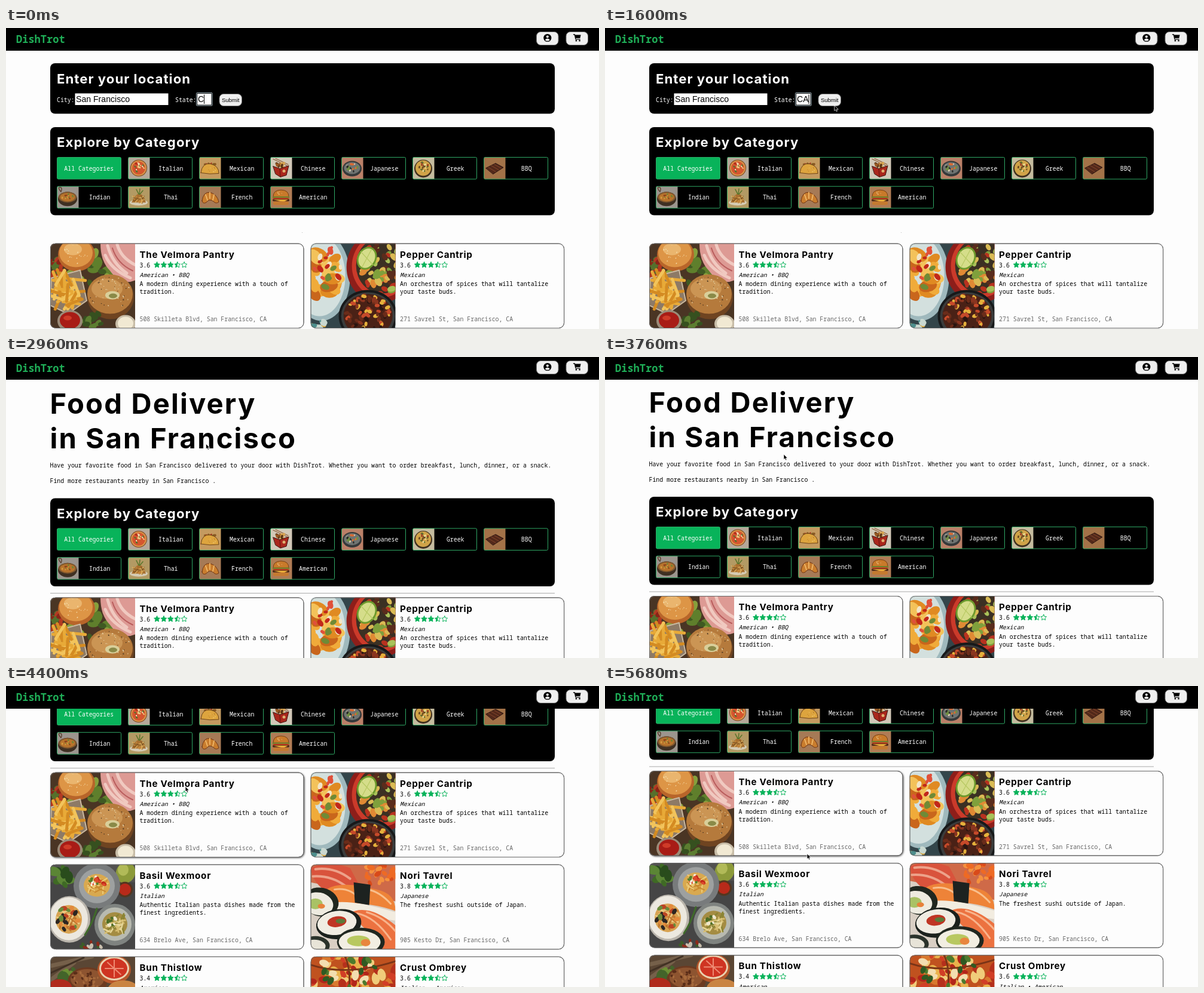
Recreate the animation shown at these times as an HTML page. Size 992 by 504 pixels, loop 5.76 s.

```html
<!DOCTYPE html>
<html lang="en">
<head>
<meta charset="utf-8">
<title>Food delivery</title>
<style>
  html, body { margin: 0; width: 100%; height: 100%; overflow: hidden; background: #fdfdfd; }
  svg { display: block; width: 992px; height: 504px; }
  text { font: 9.86px "Noto Sans Mono", "DejaVu Sans Mono", monospace; fill: #000; }
  .head { font-family: Inter, sans-serif; font-weight: 700; font-optical-sizing: none; letter-spacing: .046em; }
  .h1 { font-size: 47.2px; }
  .h2 { font-size: 22.2px; fill: #fff; }
  .h3 { font-size: 15.2px; }
  .brand { font-size: 17px; font-weight: 700; fill: #1fae57; }
  .light { fill: #fff; }
  .mid { text-anchor: middle; }
  .it { font-style: italic; }
  .addr { fill: #666; }
  .field { font: 14.1px "Liberation Sans", Arial, sans-serif; }
  .btn { font: 9.5px "Liberation Sans", Arial, sans-serif; text-anchor: middle; }
  .hover .base { filter: drop-shadow(1.5px 1.5px 1.5px rgba(0, 0, 0, .65)); }
</style>
</head>
<body>
<svg id="stage" viewBox="0 0 992 504"></svg>
<script>
let seed = 7;
const rnd = () => (seed = seed * 16807 % 2147483647) / 2147483647;

const oval = (x, y, rx, fill, ry = rx, rot = 0) =>
  `<ellipse cx="${x}" cy="${y}" rx="${rx}" ry="${ry}" fill="${fill}" transform="rotate(${rot} ${x} ${y})"/>`;
const path = (d, fill, stroke = 'none', w = 1) =>
  `<path d="${d}" fill="${fill}" stroke="${stroke}" stroke-width="${w}" stroke-linecap="round" stroke-linejoin="round"/>`;
const line = (d, stroke, w) => path(d, 'none', stroke, w);
const box = (x, y, w, h, fill, r = 0, stroke = 'none') =>
  `<rect x="${x}" y="${y}" width="${w}" height="${h}" rx="${r}" fill="${fill}" stroke="${stroke}"/>`;
const text = (x, y, str, cls = '') => `<text x="${x}" y="${y}" class="${cls}">${str}</text>`;
const group = (x, y, body, attr = '') => `<g transform="translate(${x} ${y})" ${attr}>${body}</g>`;

// Random blobs inside an oval
function bits(n, x, y, rx, ry, size, colors) {
  let out = '';
  for (let i = 0; i < n; i++) {
    const a = rnd() * 6.283, d = Math.sqrt(rnd());
    const s = size * (.6 + rnd() * .6);
    out += oval((x + Math.cos(a) * d * rx).toFixed(1), (y + Math.sin(a) * d * ry).toFixed(1),
      s.toFixed(1), colors[i % colors.length], (s * .65).toFixed(1), Math.round(rnd() * 180));
  }
  return out;
}
// Random short strokes: fries, noodles
function sticks(n, x, y, rx, ry, len, w, colors) {
  let out = '';
  for (let i = 0; i < n; i++) {
    const a = rnd() * 3.14, px = x + (rnd() * 2 - 1) * rx, py = y + (rnd() * 2 - 1) * ry;
    const dx = Math.cos(a) * len / 2, dy = Math.sin(a) * len / 2;
    out += line(`M${(px - dx).toFixed(1)} ${(py - dy).toFixed(1)}L${(px + dx).toFixed(1)} ${(py + dy).toFixed(1)}`,
      colors[i % colors.length], w);
  }
  return out;
}

const photos = {
  bagel: () => box(0, 0, 142, 142, '#4a3524')
    + bits(30, 76, 50, 42, 34, 10, ['#5f7f2c', '#86a03c', '#3f5a22'])
    + bits(16, 8, 40, 14, 18, 7, ['#b23a22', '#55702c', '#8a2418'])
    + path('M84 0H142V62Q118 72 100 46Q84 30 84 0Z', '#dd9a94')
    + line('M96 4Q104 34 128 50M112 2Q118 24 142 36M92 20Q102 44 134 58', '#f0c9c0', 5)
    + line('M104 8Q112 34 138 46', '#b95c5c', 2)
    + oval(44, 19, 31, '#b8652a', 28) + oval(43, 16, 28, '#dd9546', 24) + oval(38, 10, 15, '#eab56e', 10)
    + bits(20, 44, 16, 22, 18, 1, ['#f6dfae'])
    + path('M2 58L50 45L61 96L30 118L0 104Z', '#8d7a66', '#c9b8a0', 2)
    + sticks(38, 28, 79, 19, 22, 28, 5, ['#e8aa38', '#d48b22', '#f2c45c'])
    + oval(101, 90, 39, '#6f4421', 37) + oval(100, 85, 38, '#b57a3c', 33) + oval(95, 76, 26, '#cb9554', 17)
    + bits(60, 100, 84, 34, 29, 1.1, ['#f0dfb8', '#4a3520', '#d8b780'])
    + oval(104, 87, 12, '#d9cf9a', 7) + oval(105, 88, 7, '#8a8a48', 4)
    + bits(14, 72, 128, 18, 12, 7, ['#5c7d30', '#36501f'])
    + oval(33, 130, 21, '#9b8b78', 18) + oval(33, 129, 17, '#a81c16', 14) + oval(29, 125, 7, '#cf3b28', 4)
    + oval(126, 135, 17, '#c8bda8', 15) + oval(126, 134, 13, '#f1e9d3', 11),

  nachos: () => box(0, 0, 142, 142, '#33454a')
    + oval(18, 56, 48, '#9fb9bd', 74) + oval(15, 55, 43, '#d3e0de', 67)
    + bits(26, 20, 52, 26, 46, 15, ['#e08a22', '#f0ab3a', '#c9661c', '#f3c25a'])
    + bits(18, 28, 40, 22, 34, 6, ['#c2281a', '#e0503a', '#6f8a36', '#f2e6c8'])
    + oval(116, 40, 56, '#8d1e1a', 60) + oval(118, 38, 49, '#cb3a2a', 53) + oval(119, 37, 43, '#3b3023', 47)
    + bits(70, 120, 42, 36, 42, 7, ['#7fa03c', '#d9bb55', '#b8321f', '#5a2c1c', '#a9c25a', '#e08a34'])
    + oval(94, 25, 16, '#6d9a2c', 20, 28) + oval(94, 25, 13, '#d5dd8a', 17, 28)
    + line('M84 14L104 36M102 10L86 40', '#b7c862', 1.2)
    + oval(96, 122, 49, '#17191a', 44) + oval(96, 122, 45, '#3a3c3c', 40) + oval(96, 121, 41, '#4a2116', 36)
    + bits(80, 96, 118, 37, 31, 4.4, ['#6b2c1a', '#2a1510', '#e5b13c', '#8a3520', '#c64a2a'])
    + bits(12, 10, 137, 20, 9, 6, ['#d8a43c', '#4d8f8d', '#c9d8d0']),

  pasta: () => box(0, 0, 142, 142, '#454545') + box(0, 0, 142, 30, '#525150')
    + bits(12, 20, 20, 18, 17, 10, ['#3f6a25', '#5b8535', '#294c1c'])
    + oval(126, 14, 16, '#8c9a3a', 18, 25) + oval(122, 9, 9, '#b1ba58', 10)
    + oval(125, 42, 13, '#55361f') + oval(125, 42, 10, '#b82a1a')
    + oval(78, 36, 39, '#787b7c', 38) + oval(78, 36, 30, '#9da0a0', 29)
    + oval(78, 35, 22, '#d9a94f', 19) + sticks(26, 78, 34, 14, 11, 12, 2, ['#edcc7a', '#c9882f'])
    + bits(16, 78, 31, 14, 12, 4, ['#c2281a', '#dd4a2c', '#557f2c', '#f4eee0'])
    + oval(32, 92, 35, '#bab5ac', 39) + oval(31, 91, 32, '#ece8df', 36)
    + oval(31, 92, 22, '#d8a352', 24) + sticks(30, 31, 92, 15, 16, 13, 2.2, ['#eccb84', '#c0762e'])
    + bits(20, 30, 90, 18, 20, 5, ['#2c2622', '#bb4424', '#e38a3c', '#6a8a3a'])
    + line('M58 118Q70 100 78 74', '#3f6a2a', 3)
    + oval(108, 101, 34, '#7f8380', 35) + oval(108, 100, 28, '#b8bab0', 28)
    + oval(108, 100, 21, '#a48c42', 20) + sticks(34, 108, 100, 15, 13, 10, 2.6, ['#d7be72', '#8a8434', '#e5d596'])
    + bits(8, 108, 98, 12, 12, 4, ['#4d6d25', '#efe7cd'])
    + bits(10, 70, 136, 18, 6, 5, ['#8d2a1a', '#3d5d28', '#c9bfae']),

  sushi: () => box(0, 0, 142, 142, '#d9cfc4')
    + path('M0 0H142V62L70 44L0 30Z', '#cf6a48')
    + path('M0 6Q30 -8 66 6L84 40L22 42Q4 30 0 6Z', '#d9533c')
    + line('M8 8Q40 4 66 24M4 20Q34 18 58 36', '#eda28a', 4)
    + bits(22, 112, 16, 28, 18, 6, ['#ee6a24', '#f5913e', '#d94a1a'])
    + path('M26 42Q50 26 110 42Q142 48 142 78Q92 60 30 66Z', '#ee8338')
    + line('M40 42Q66 38 82 58M96 42Q116 46 134 66', '#f9bf8c', 3)
    + path('M72 30L100 34L98 68L74 64Z', '#1d2220')
    + path('M30 66Q60 56 142 80V94L60 84Z', '#f2ece0')
    + path('M64 82Q96 64 142 102V142H120Q92 106 64 82Z', '#ec7240')
    + line('M78 82Q108 88 134 126M94 80Q122 88 142 112', '#f8b48c', 3)
    + oval(17, 63, 30, '#20271f', 24, 12) + oval(13, 66, 25, '#eeebe0', 19, 12)
    + oval(8, 66, 12, '#a9c265', 9) + oval(18, 70, 6, '#e7813a', 4)
    + oval(47, 100, 38, '#1b211d', 25, -8) + oval(44, 98, 33, '#f0ece2', 20, -8)
    + oval(44, 96, 16, '#bf3524', 9, -8) + oval(50, 95, 8, '#5b7a3a', 4)
    + oval(84, 130, 40, '#202720', 24) + oval(82, 130, 35, '#f2eee2', 19)
    + oval(80, 128, 19, '#b8c860', 9) + oval(92, 131, 8, '#e8863e', 6)
    + oval(8, 136, 24, '#2a322a', 16) + oval(6, 137, 19, '#e8e4d8', 11),

  burger: () => box(0, 0, 142, 142, '#5a4634')
    + line('M0 16L70 0M0 40L40 10', '#75604a', 7) + line('M0 28L56 2', '#413124', 3)
    + bits(14, 32, 36, 26, 14, 8, ['#6d8f34', '#43642a'])
    + oval(62, 42, 33, '#6c3a20', 24) + oval(62, 38, 28, '#8d5430', 17)
    + bits(30, 62, 38, 26, 16, 3, ['#5a2d18', '#a66a3c'])
    + oval(107, 22, 28, '#b5562a', 24) + oval(107, 20, 25, '#ead2b0', 20) + oval(107, 20, 22, '#cf3422', 17)
    + line('M92 20H122M107 6V34M96 10L118 30', '#ee8a72', 2)
    + oval(16, 52, 20, '#b02a1c', 14) + oval(122, 56, 26, '#c98442', 16),

  pizza: () => box(0, 0, 142, 142, '#c0521f')
    + bits(50, 72, 40, 78, 50, 12, ['#d9792e', '#e9b24c', '#b5301c', '#f0cc7a'])
    + bits(32, 72, 35, 74, 42, 8, ['#b3251a', '#d13e26', '#f3deb0'])
    + line('M0 14Q60 34 142 8M56 -4Q72 30 60 70', '#7a3417', 3)
    + bits(12, 72, 26, 66, 26, 8, ['#2f5a22', '#4d7a2c'])
};

const icons = {
  Italian: ['#b5a899', () => oval(18, 18, 14, '#7e3f20') + oval(18, 18, 13, '#d99a4a') + oval(18, 18, 11, '#d5562f')
    + bits(16, 18, 18, 9, 9, 2.2, ['#f0cf86', '#a82418', '#f2e0b4', '#56702c'])],
  Mexican: ['#c49a60', () => bits(16, 17, 15, 12, 5, 3, ['#5d7a2a', '#a83820', '#8a5a24'])
    + path('M3 26Q5 9 19 11Q33 14 33 27Q18 29 3 26Z', '#dda43e', '#6f4418', 1)
    + bits(8, 18, 21, 11, 5, 1.1, ['#b87a26', '#efc66c'])],
  Chinese: ['#d2c8b8', () => line('M5 3L28 14M9 2L30 12', '#8a5a34', 1.2)
    + bits(12, 18, 14, 10, 4, 3, ['#9a5a24', '#d9a450', '#5b3518'])
    + path('M5 15L16 19L31 14L27 30L17 33L9 28Z', '#a9271c', '#3c1410', 1)
    + line('M16 19L17 32', '#5f130e', 1) + oval(23, 23, 2.5, '#e0b070')],
  Japanese: ['#bb8068', () => oval(18, 19, 16, '#35393a', 13) + oval(18, 18, 13.5, '#6f7472', 10)
    + bits(18, 18, 18, 10, 7, 2.6, ['#d96a34', '#708f42', '#ead9ba', '#2c2d2b'])],
  Greek: ['#c5bc9f', () => oval(18, 19, 15, '#40301f') + oval(18, 18, 13, '#d0a348')
    + bits(24, 18, 18, 10, 10, 2, ['#6a4a20', '#eed896', '#5d7030', '#9b3b22'])],
  BBQ: ['#a37248', () => path('M4 18L20 10L33 17L16 28Z', '#52281a', '#2c1510', 1)
    + line('M8 17L20 24M13 14L25 21M18 12L29 18', '#7a4128', 1.2)],
  Indian: ['#9c958e', () => line('M7 9Q1 2 5 1Q10 2 7 9', '#5c4432', 1.5) + oval(18, 21, 16, '#3f3023', 12)
    + oval(18, 18, 15, '#81582e', 9) + oval(18, 18, 12.5, '#b8742c', 7)
    + bits(12, 18, 18, 10, 5, 1.8, ['#8a3f1c', '#6f8434', '#d7a044'])],
  Thai: ['#b39a64', () => oval(18, 27, 15, '#d5cbb4', 5) + path('M6 27Q13 12 19 12Q27 14 30 27Z', '#a87030')
    + sticks(20, 18, 22, 8, 4, 8, 1.2, ['#dfb464', '#7c5222', '#c98a3c'])
    + line('M18 13L14 5M19 13L20 4M20 13L25 7', '#58762c', 1.5)],
  French: ['#a67a56', () => path('M5 24Q7 9 18 10Q30 13 33 26Q28 30 24 25Q17 20 12 27Q6 30 5 24Z', '#c97d2e', '#6f3514', 1)
    + line('M11 14L14 23M18 10L18 20M25 14L23 23', '#f0b768', 1.8)],
  American: ['#b07c55', () => path('M5 17Q5 6 18 6Q31 6 31 17Z', '#c97a2a', '#63330f', .8)
    + bits(9, 18, 11, 9, 3, .7, ['#f4dca4']) + box(4, 17, 28, 3, '#6d8b2e', 1) + box(5, 19, 26, 3, '#c93a22', 1)
    + box(4, 21, 28, 4, '#4c2614', 2) + path('M5 22H30L22 26Z', '#eeb23a') + box(5, 25, 26, 6, '#c47a30', 3)]
};

const green = '#08b35a';

function category(name, i) {
  const x = 85 + i % 7 * 119, y = 50.5 + (i > 6) * 48.7;
  if (!icons[name]) return box(x + .5, y, 107, 36.5, green, 2, '#2fa865') + text(x + 53.7, y + 22, name, 'mid light');
  const [tone, draw] = icons[name];
  return group(x, y, box(.5, 0, 107, 36.5, '#000', 2) + box(1, 0, 35.5, 36.5, tone) + draw()
    + box(.5, 0, 107, 36.5, 'none', 2, '#2fa865') + text(71.7, 22, name, 'mid light'));
}

const starPts = [...Array(10).keys()].map(i => {
  const a = -Math.PI / 2 - i * Math.PI / 5, r = i % 2 ? 2.5 : 5.1;
  return (r * Math.cos(a)).toFixed(2) + ' ' + (r * Math.sin(a)).toFixed(2);
});
const star = (i, score) => group(178.5 + 11.4 * i, 36.3,
  path(`M${starPts.join('L')}Z`, score - i >= 1 ? green : 'none', green, 1)
  + (score - i === .5 ? path(`M${starPts.slice(0, 6).join('L')}Z`, green) : ''));

function card([photo, name, rating, kinds, desc, addr], i) {
  const stars = Math.round(rating * 2) / 2;
  return group(74 + i % 2 * 435.6, Math.floor(i / 2) * 154.2,
    box(.5, .5, 423.5, 141.5, '#fdfdfd', 9, '#666').replace('<rect', '<rect class="base"')
    + `<g clip-path="url(#photo)">${photos[photo]()}</g>`
    + box(.5, .5, 423.5, 141.5, 'none', 9, '#666')
    + text(149.5, 24, name, 'head h3') + text(149.5, 40, rating, '')
    + [0, 1, 2, 3, 4].map(n => star(n, stars)).join('')
    + text(149.5, 56.3, kinds, 'it')
    + desc.map((s, n) => text(149.5, 71.7 + n * 13, s)).join('')
    + text(149.5, 130.6, addr, 'addr'), `id="card${i}"`);
}

const cards = [
  ['bagel', 'The Velmora Pantry', 3.6, 'American • BBQ', ['A modern dining experience with a touch of', 'tradition.'], '508 Skilleta Blvd, San Francisco, CA'],
  ['nachos', 'Pepper Cantrip', 3.6, 'Mexican', ['An orchestra of spices that will tantalize', 'your taste buds.'], '271 Savrel St, San Francisco, CA'],
  ['pasta', 'Basil Wexmoor', 3.6, 'Italian', ['Authentic Italian pasta dishes made from the', 'finest ingredients.'], '634 Brelo Ave, San Francisco, CA'],
  ['sushi', 'Nori Tavrel', 3.8, 'Japanese', ['The freshest sushi outside of Japan.'], '905 Kesto Dr, San Francisco, CA'],
  ['burger', 'Bun Thistlow', 3.4, 'American', [], ''],
  ['pizza', 'Crust Ombrey', 3.6, 'Italian • American', [], '']
];

const form = box(74, 59, 844, 84.5, '#000', 8) + text(85, 92.5, 'Enter your location', 'head h2')
  + text(85, 124, 'City:', 'light') + box(115.5, 109.5, 156, 19.5, '#fff') + text(117, 124, 'San Francisco', 'field')
  + text(283, 124, 'State:', 'light') + box(318.5, 108.5, 26.5, 21.5, '#000', 1, '#a9bcc4') + box(320, 110, 23.5, 18.5, '#fff')
  + '<text id="state" x="321" y="124" class="field"></text>' + `<g id="caret">${box(331, 111.5, 1, 15.5, '#000')}</g>`
  + box(357, 110.5, 37.5, 20, '#efefef', 7, '#777') + text(375.7, 124, 'Submit', 'btn')
  + box(495, 342, 1, 1, '#bbb');

const intro = text(73.5, 95, 'Food Delivery', 'head h1') + text(73.5, 153, 'in San Francisco', 'head h1')
  + text(73.5, 185.3, 'Have your favorite food in San Francisco delivered to your door with DishTrot. Whether you want to order breakfast, lunch, dinner, or a snack.')
  + text(73.5, 211.3, 'Find more restaurants nearby in San Francisco .') + box(74, 395, 844, 1, '#aaa');

const header = box(0, 0, 992, 38, '#000') + text(17, 24.8, 'DishTrot', 'brand')
  + box(887.5, 6.5, 36.5, 22, '#efefef', 7, '#777') + box(937, 6.5, 36.5, 22, '#efefef', 7, '#777')
  + oval(905.8, 16.5, 6.6, '#000') + oval(905.8, 14.6, 2.1, '#efefef') + path('M902 20.4Q902.4 17.8 905.8 17.8Q909.2 17.8 909.6 20.4Q905.8 23 902 20.4Z', '#efefef')
  + line('M949.4 11H951.3L953 18.9H960.2', '#000', 1.3) + path('M951.6 11.6H961.6L960.4 17H952.8Z', '#000')
  + oval(953.9, 21.3, 1.3, '#000') + oval(959.5, 21.3, 1.3, '#000');

const byId = id => document.getElementById(id);
byId('stage').innerHTML =
  '<defs><clipPath id="photo"><path d="M142 0H9Q0 0 0 9V133Q0 142 9 142H142Z"/></clipPath></defs>'
  + box(0, 0, 992, 504, '#fdfdfd')
  + `<g id="form">${form}</g><g id="intro">${intro}</g>`
  + `<g id="cats">${box(74, 0, 844, 147.5, '#000', 8)}${text(85, 33.3, 'Explore by Category', 'head h2')}${['All Categories', ...Object.keys(icons)].map(category).join('')}</g>`
  + `<g id="cards">${cards.map(card).join('')}</g>` + header
  + `<g id="mouse">${path('M0 0V8.6L2 6.9L3.4 9.9L4.9 9.2L3.6 6.3H6.2Z', '#000', '#fff', .7)}</g>`;

const LOOP = 5760, STEP = 80, SWITCH = 1760;
const route = [[1360, 425, 178], [1680, 376, 121], [1840, 377, 120], [2080, 382, 114], [2560, 370, 128],
  [3360, 299, 163], [3760, 299, 163], [4080, 300, 167], [4560, 300, 169], [4880, 249, 265], [5280, 290, 274], [5680, 338, 281]];

const ease = (t, a, b) => {
  const k = Math.min(1, Math.max(0, (t - a) / (b - a)));
  return k * k * (3 - 2 * k);
};
function mouseAt(t) {
  let i = 0;
  while (i < route.length - 2 && t > route[i + 1][0]) i++;
  const [a, b] = [route[i], route[i + 1]], k = ease(t, a[0], b[0]);
  return [a[1] + (b[1] - a[1]) * k, a[2] + (b[2] - a[2]) * k];
}
const show = (id, on) => byId(id).setAttribute('visibility', on ? 'visible' : 'hidden');
const move = (id, x, y) => byId(id).setAttribute('transform', `translate(${x} ${y})`);

function draw(now) {
  const t = Math.floor(now % LOOP / STEP) * STEP;
  const found = t >= SWITCH, typed = t >= 400;
  const scroll = Math.round(ease(t, 3720, 4440) * 521) / 2;
  const [mx, my] = mouseAt(t);
  const top = found ? 402.5 - scroll : 360.5;

  show('form', !found);
  show('intro', found);
  byId('state').textContent = typed ? 'CA' : 'C';
  show('caret', !found && (t < 880 || t >= 1360));
  move('caret', typed ? 9.4 : 0, 0);
  move('intro', 0, -scroll);
  move('cats', 0, found ? 236.5 - scroll : 166);
  move('cards', 0, top);
  byId('card0').classList.toggle('hover', found && my > top && my < top + 142);
  show('mouse', t >= 1360);
  move('mouse', mx.toFixed(1), my.toFixed(1));
}
function tick() {
  draw(performance.now());
  requestAnimationFrame(tick);
}
tick();
</script>
</body>
</html>
```
